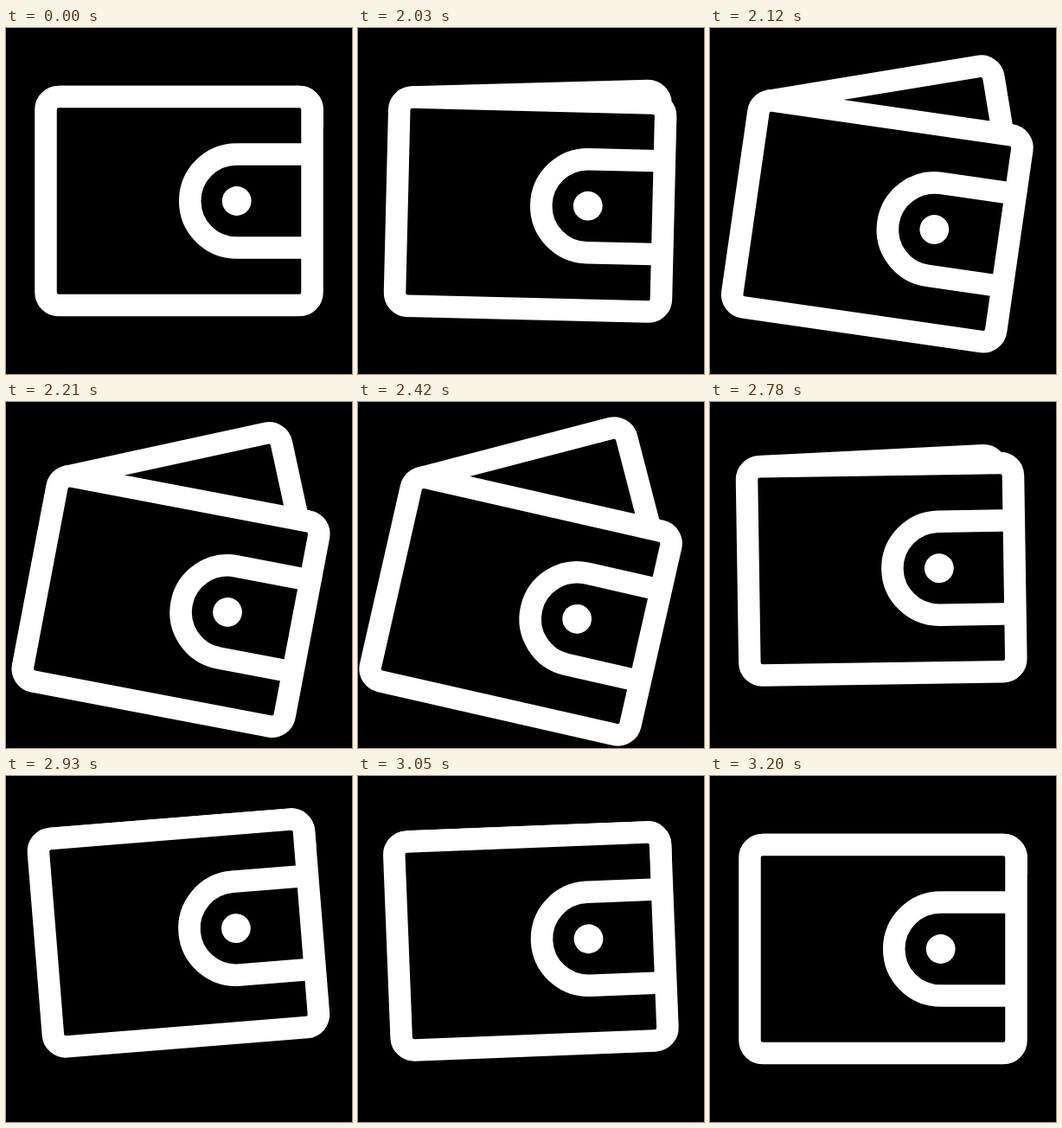
An HTML page with a canvas that plays this animation: 400 by 400 pixels, repeating every 3.23 s.

```html
<!DOCTYPE html>
<html lang="en">
<head>
<meta charset="utf-8">
<title>Wallet</title>
<style>
  html, body { margin: 0; width: 100%; height: 100%; overflow: hidden; background: #000; }
  canvas { display: block; }
</style>
</head>
<body>
<canvas id="stage" width="400" height="400"></canvas>
<script>
const ctx = document.getElementById('stage').getContext('2d');
const LOOP = 3230, REST = 2000, STEP = 30, OPEN_STEPS = 18;
const STROKE = 25.5;
const HINGE = { x: 33.3, y: 165 };
const CORNER = { x: 60.8, y: 94.2 };
const OPEN = { wallet: 13, card: -14.8, shrink: 51.5 };

// Closing poses: step, wallet angle, card angle, swing of the whole icon, card shortening
const CLOSING = [
  [18, OPEN.wallet, OPEN.card, 0, OPEN.shrink],
  [21, 10.9, -13.8, 1.1, 48.7],
  [26, -0.9, -2.9, 3.8, 19],
  [28, -3.8, -4.1, 4.5, 7],
  [30, -4.8, -4.8, 4.8, 0],
  [31, -4.6, -4.6, 4.6, 0],
  [36, -1.7, -1.7, 1.7, 0],
  [40, 0, 0, 0, 0]
];

const rad = deg => deg * Math.PI / 180;
const bezier = (a, b, s) => 3 * (1 - s) ** 2 * s * a + 3 * (1 - s) * s * s * b + s ** 3;

function easeOpen(u) {
  let lo = 0, hi = 1;
  for (let i = 0; i < 30; i++) {
    const mid = (lo + hi) / 2;
    if (bezier(0.167, 0, mid) < u) lo = mid; else hi = mid;
  }
  return bezier(0.167, 1, lo);
}

// Monotone cubic interpolation of one column of the key poses
function track(keys, col, t) {
  const slope = i => (keys[i + 1][col] - keys[i][col]) / (keys[i + 1][0] - keys[i][0]);
  const tangent = i => {
    if (i === 0 || i === keys.length - 1) return 0;
    const a = slope(i - 1), b = slope(i);
    return a * b <= 0 ? 0 : 2 * a * b / (a + b);
  };
  let i = 0;
  while (i < keys.length - 2 && t > keys[i + 1][0]) i++;
  const h = keys[i + 1][0] - keys[i][0];
  const u = (t - keys[i][0]) / h;
  const blend = u * u * (3 - 2 * u);
  return keys[i][col] * (1 - blend) + keys[i + 1][col] * blend
    + h * u * (1 - u) * ((1 - u) * tangent(i) - u * tangent(i + 1));
}

function poseAt(step) {
  if (step <= OPEN_STEPS) {
    const p = step > 0 ? easeOpen(step / OPEN_STEPS) : 0;
    return { wallet: OPEN.wallet * p, card: OPEN.card * p, swing: 0, shrink: OPEN.shrink * p };
  }
  const [wallet, card, swing, shrink] = [1, 2, 3, 4].map(col => track(CLOSING, col, step));
  return { wallet, card, swing, shrink };
}

function drawCard(angle, shrink) {
  const length = 278.4 - shrink;
  const drop = 20 + 4 * Math.abs(angle);
  ctx.save();
  ctx.translate(CORNER.x, CORNER.y);
  ctx.rotate(rad(angle));
  ctx.beginPath();
  ctx.moveTo(0, -14.8);
  ctx.lineTo(length, -14.8);
  ctx.arc(length, 0, 14.8, -Math.PI / 2, 0);
  ctx.lineTo(length + 14.8, drop);
  ctx.stroke();
  ctx.restore();
}

function drawWallet() {
  ctx.beginPath();
  ctx.roundRect(46, 79.4, 308, 241.2, 14.8);
  ctx.fillStyle = '#000';
  ctx.fill();
  ctx.stroke();

  ctx.beginPath();
  ctx.moveTo(354, 146);
  ctx.lineTo(266.7, 146);
  ctx.arc(266.7, 200, 54, -Math.PI / 2, Math.PI / 2, true);
  ctx.lineTo(354, 254);
  ctx.stroke();

  ctx.beginPath();
  ctx.arc(266.7, 200, 16.9, 0, 2 * Math.PI);
  ctx.fillStyle = '#fff';
  ctx.fill();
}

function draw(time) {
  const step = Math.min(40, Math.max(0, Math.floor((time - REST) / STEP)));
  const pose = poseAt(step);
  ctx.fillStyle = '#000';
  ctx.fillRect(0, 0, 400, 400);
  ctx.strokeStyle = '#fff';
  ctx.lineWidth = STROKE;
  ctx.save();
  ctx.translate(HINGE.x - 0.62 * pose.swing, HINGE.y - 1.09 * pose.swing);
  ctx.rotate(rad(pose.wallet));
  ctx.translate(-HINGE.x, -HINGE.y);
  drawCard(pose.card - pose.wallet, pose.shrink);
  drawWallet();
  ctx.restore();
}

const start = performance.now();
function tick() {
  draw((performance.now() - start) % LOOP);
  requestAnimationFrame(tick);
}
tick();
</script>
</body>
</html>
```
